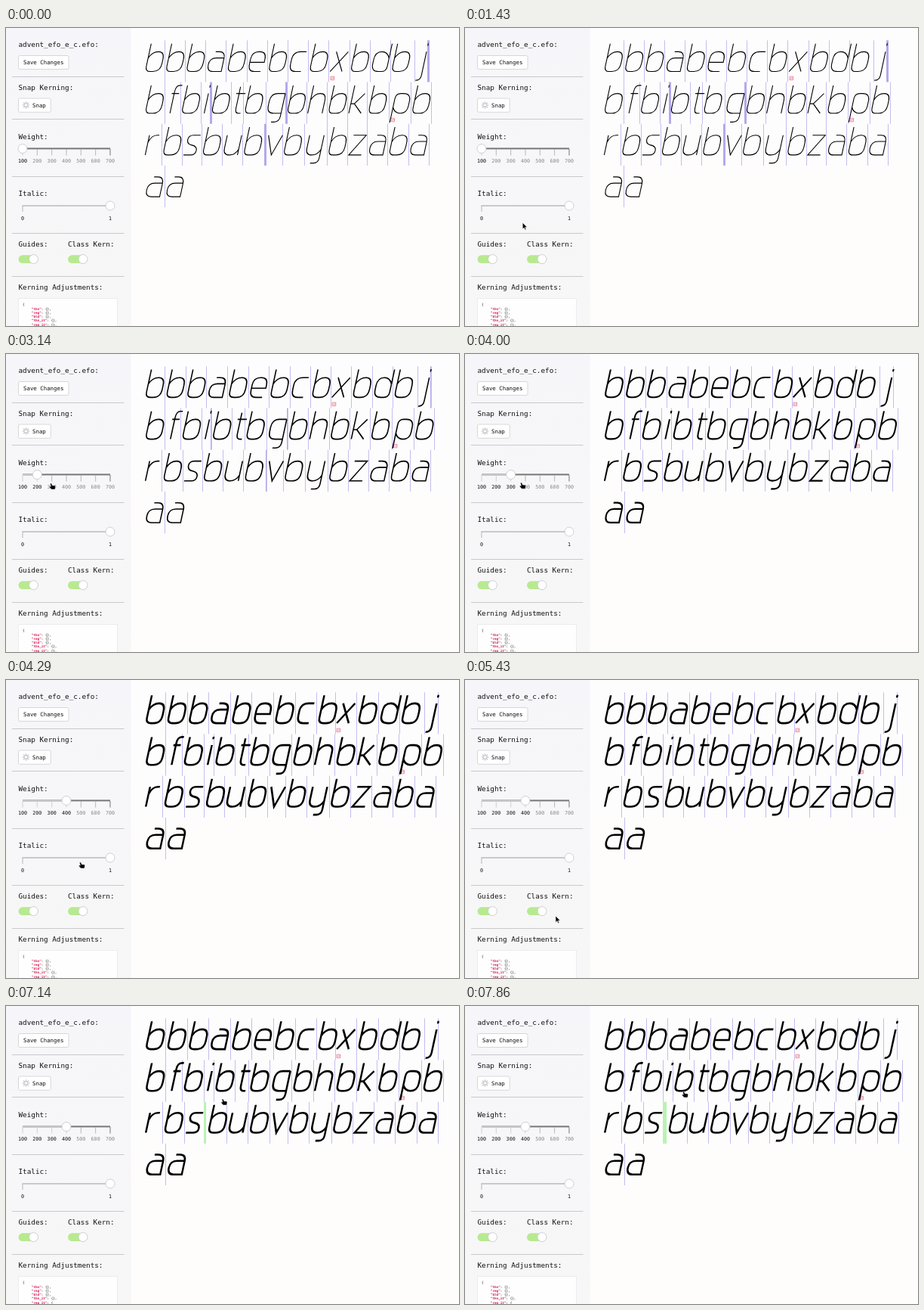
Write an HTML page that moves like this. It is 600 px wide and 394 px high and loops after 8 s.

```html
<!DOCTYPE html>
<html lang="en">
<head>
<meta charset="utf-8">
<title>Kerning editor</title>
<style>
  html, body { margin: 0; width: 100%; height: 100%; overflow: hidden; background: #fefdfd; }
  svg { display: block; width: 100vw; height: 100vh; }
  text { font-family: "DejaVu Sans Mono", monospace; fill: #111; white-space: pre; }
  .label { font-size: 9.3px; }
  .button { font-size: 7.4px; }
  .tick { font-size: 6.7px; text-anchor: middle; }
  .code { font-size: 4.3px; }
  .key { fill: #d3134f; font-weight: bold; }
  .box { fill: #fff; stroke: #cfcfd2; stroke-width: .8; }
  .rule { stroke: #c9c8cb; stroke-width: 1; }
  .knob { fill: #fff; stroke: #c4c4c6; stroke-width: .8; }
  .glyph { fill: none; stroke: #000; }
</style>
</head>
<body>
<svg id="stage" viewBox="0 0 600 394">
  <linearGradient id="paper" x2="0" y2="1"><stop stop-color="#fefdfe"/><stop offset="1" stop-color="#fefdfb"/></linearGradient>
  <linearGradient id="side" x2="0" y2="1"><stop stop-color="#f6f5f9"/><stop offset="1" stop-color="#f8f7f7"/></linearGradient>
  <rect width="600" height="394" fill="url(#paper)"/>
  <rect width="165.5" height="394" fill="url(#side)"/>
  <g id="panel"></g>
  <g id="weight"></g>
  <g id="sheet"></g>
  <g id="cursor" stroke="#fff" stroke-width=".5"></g>
</svg>
<script>
const LOOP = 8000, RATE = 7;

// Pen paths on an upright grid: baseline 0, x-height 27, ascender 38.
const PEN = {
  a: "M6.6 27H12Q20.5 27 20.5 18V0H8.5Q0 0 0 9Q0 18.5 9.5 18.5H20.5",
  b: "M0 38V7Q0 0 7 0H11Q21.5 0 21.5 11V17Q21.5 27 13 27Q4 27 0 18",
  c: "M19 27H11Q0 27 0 16V10Q0 0 9 0H17",
  d: "M21.5 38V7Q21.5 0 14.5 0H10.5Q0 0 0 10V16Q0 27 9.5 27Q17.5 27 21.5 18",
  e: "M0 12.5H20.5V17Q20.5 27 11 27H10Q0 27 0 17V10Q0 0 9 0H18",
  f: "M6 0V29Q6 38 12 38H15M2.5 27H13",
  g: "M20.5 27H10Q0 27 0 16V10Q0 0 10 0H20.5M20.5 27V-4Q20.5 -12 13 -12H9",
  h: "M0 38V0M0 18Q4 27 12 27Q20.5 27 20.5 18V0",
  i: "M3 0V27M3 35V38.5",
  j: "M9 27V-5Q9 -12 2 -12M9 35V38.5",
  k: "M0 38V0M0 13H5L17 27M5 13L17.5 0",
  p: "M2 -12.5V20Q2 27 9 27H13Q23.5 27 23.5 16V10Q23.5 0 14 0Q6 0 2 8",
  r: "M0 0V27M0 17Q3 27 11 27H14",
  s: "M18.5 27H8.5Q1.5 27 1.5 21Q1.5 15 9 13.5Q17 12 17 6Q17 0 10 0H0",
  t: "M4 36V7Q4 0 9 0H12M0 27H13",
  u: "M0 27V9Q0 0 9 0Q17 0 20.5 8M20.5 27V0",
  v: "M-3 27L7 0L17 27",
  x: "M0 0L20 27M3 27L17 0",
  y: "M0 27V9Q0 0 9 0Q17 0 20.5 8M20.5 27V-4Q20.5 -11 14 -11H9",
  z: "M1 27H19L0 0H18"
};
const LINES = ["bbbabebcbxbdbj", "bfbibtbgbhbkbpb", "rbsbubvbybzaba", "aa"];

// Advances relative to a "b", and pair kerning from thin to regular.
const ADVANCE = { f: .77, i: .46, j: .65, k: .95, p: 1.05, r: .86, s: .93, t: .61, v: .83, y: 1.03, z: .96 };
const KERN = { bx: [0, -4], bu: [0, -2], bj: [5, 4], bg: [2, 0], bp: [2, 1], bv: [3, 0], by: [2, 0], yb: [2, 0] };
const STRONG = ["j", "ib", "gb", "bv"];
const FLAGGED = ["bx", "bp"];

// Pointer key points: step, x, y.
const TRACK = [
  [6, 150, 390], [13, 21, 158], [17, 41.5, 174], [20, 41.5, 174], [22, 59.5, 171], [29, 77, 170],
  [31, 120, 312], [38, 120, 312], [45, 277.5, 145.5], [48, 286, 127], [55, 289.5, 113]
];
const ARROW = "M0 0V8.4L2 6.6L3.4 9.6L4.7 9L3.4 6.1H6Z";
const HAND = "M-1 .3Q-.8-.3 0 0L1 .4L1.8 2.8L5 3Q6.2 3.2 6 4.4L5.4 8H.6L-2.2 4.8Q-2 3.8-.8 4L-.2 4.2Z";

const byId = id => document.getElementById(id);
const mix = (a, b, f) => a + (b - a) * f;
const tag = (name, attrs, body = "") =>
  `<${name} ${Object.entries(attrs).map(([k, v]) => `${k}="${v}"`).join(" ")}>${body}</${name}>`;
const text = (cls, x, y, body, fill = "#111") =>
  tag("text", { class: cls, x, y, style: `fill:${fill}` }, body);
const rect = (x, y, width, height, fill) => tag("rect", { x, y, width, height, fill });
const box = (x, y, width, height) => tag("rect", { class: "box", x, y, width, height, rx: 2 });
const knob = (cx, cy) => tag("circle", { class: "knob", cx, cy, r: 6 });
const toggle = x =>
  tag("rect", { x, y: 300.3, width: 26, height: 10.8, rx: 5.4, fill: "#b7ea90" }) + knob(x + 20, 305.6);

function drawPanel() {
  const labels = [
    [16.5, 25, "advent_efo_e_c.efo:"], [16.5, 81.5, "Snap Kerning:"], [16.5, 147, "Weight:"],
    [16.5, 222.3, "Italic:"], [16.5, 289.3, "Guides:"], [82, 289.3, "Class Kern:"],
    [16.5, 346.3, "Kerning Adjustments:"]
  ];
  let out = labels.map(([x, y, s]) => text("label", x, y, s)).join("");
  for (const y of [64.5, 120.5, 196.5, 271.5, 328.5])
    out += tag("path", { class: "rule", d: `M8 ${y}H156.5` });
  out += box(16.5, 36.5, 66.5, 18) + text("button", 23, 48, "Save Changes");
  out += box(16.5, 93, 42.7, 18.3) + text("button", 35, 104.6, "Snap");
  for (let i = 0; i < 8; i++)
    out += tag("path", { d: "M0 -1.5V-4.6", stroke: "#b5b5b8", "stroke-width": 1.1,
      transform: `translate(26.5 102)rotate(${i * 45})` });
  out += rect(21.5, 234, 116, 2, "#c9c8cb") + rect(21.5, 235, 1, 8, "#b5b5b8") + knob(138, 235);
  out += text("tick", 22, 253.6, "0") + text("tick", 138, 253.6, "1");
  out += toggle(16.5) + toggle(82);
  out += tag("rect", { x: 16.5, y: 357.5, width: 131, height: 50, fill: "#fefefe", stroke: "#ececee" });
  byId("panel").innerHTML = out;
}

function drawWeight(w, edited) {
  const at = i => 22 + i * 19.33;
  let out = rect(22, 158.4, 116, 2, "#777") + rect(22, 158.4, at(w) - 22, 2, "#c9c8cb");
  for (let i = 0; i < 7; i++) {
    out += rect(at(i) - .5, 160, 1, 8.5, i === 6 ? "#777" : i > w ? "#b8b8ba" : "#d0d0d2");
    out += text("tick", at(i), 178.4, 100 * (i + 1), i > w ? "#888" : "#111");
  }
  out += knob(at(w), 159.5) + text("code", 22, 367.3, "{");
  ["thn", "reg", "bld", "thn_it", "reg_it"].forEach((key, i) => {
    const value = key === "reg_it" && edited ? ": {" : ": {},";
    out += text("code", 33.8, 372.7 + i * 5.2, `<tspan class="key">"${key}"</tspan>${value}`);
  });
  byId("weight").innerHTML = out;
}

function warning(x, y) {
  return tag("path", { fill: "none", stroke: "#e0607a", "stroke-width": .7,
    d: `M${x} ${y}h4.6v4.4h-4.6zM${x + .8} ${y + 3.3}l1.3-1.6 1 .9 1-1.5` });
}

function drawSheet(w, picked, shift) {
  const growth = (w / 3) ** 1.2, stroke = 1.2 + .5 * w;
  let guides = "", glyphs = "";
  LINES.forEach((line, r) => {
    const top = 16.3 + 55.2 * r, base = top + 41.6 - stroke * .3;
    let x = 183.2;
    [...line].forEach((char, i) => {
      const pair = char + (line[i + 1] || "");
      glyphs += tag("path", { class: "glyph", d: PEN[char], "stroke-width": stroke,
        transform: `matrix(.93 0 .21 -.97 ${x + .5 + stroke * .55} ${base})` });
      x += mix(27.2, 28.55, growth) * (ADVANCE[char] || 1) + mix(...(KERN[pair] || [0, 0]), growth);
      if (FLAGGED.includes(pair)) glyphs += warning(x + 2, top + 47.9);
      if (pair === "a" && line.length === 2) return;
      const strong = STRONG.includes(pair) && w < 2;
      if (picked && pair === "sb") {
        guides += rect(x - .8, top, Math.max(1.2, shift), 55.2, "#b9f3b2");
        x += shift;
      } else {
        const width = strong ? 3 - 1.3 * w : 1;
        guides += rect(Math.round(x - width / 2), top, width, 55.2, strong ? "#b3a9ec" : "#c3bdf0");
      }
    });
  });
  byId("sheet").innerHTML = guides + glyphs;
}

function drawCursor(step) {
  const next = TRACK.findIndex(p => p[0] > step);
  if (next === 0) { byId("cursor").innerHTML = ""; return; }
  const b = TRACK.at(next), a = next < 0 ? b : TRACK[next - 1];
  const f = a === b ? 1 : (step - a[0]) / (b[0] - a[0]);
  const x = mix(a[1], b[1], f), y = mix(a[2], b[2], f);
  const overSlider = step >= 13 && step <= 30;
  byId("cursor").innerHTML = tag("path", { d: overSlider || x > 184 ? HAND : ARROW,
    transform: `translate(${x} ${y})` });
}

let shown = -1;
const start = performance.now();

function frame() {
  const time = (performance.now() - start) % LOOP;
  const step = Math.floor((time + 5) * RATE / 1000);
  if (step !== shown) {
    shown = step;
    const weight = [18, 24, 29].filter(s => step >= s).length;
    const shift = step < 50 ? 0 : step < 51 ? 3 : 5;
    drawWeight(weight, shift > 0);
    drawSheet(weight, step >= 47, shift);
    drawCursor(step);
  }
  requestAnimationFrame(frame);
}

drawPanel();
frame();
</script>
</body>
</html>
```
